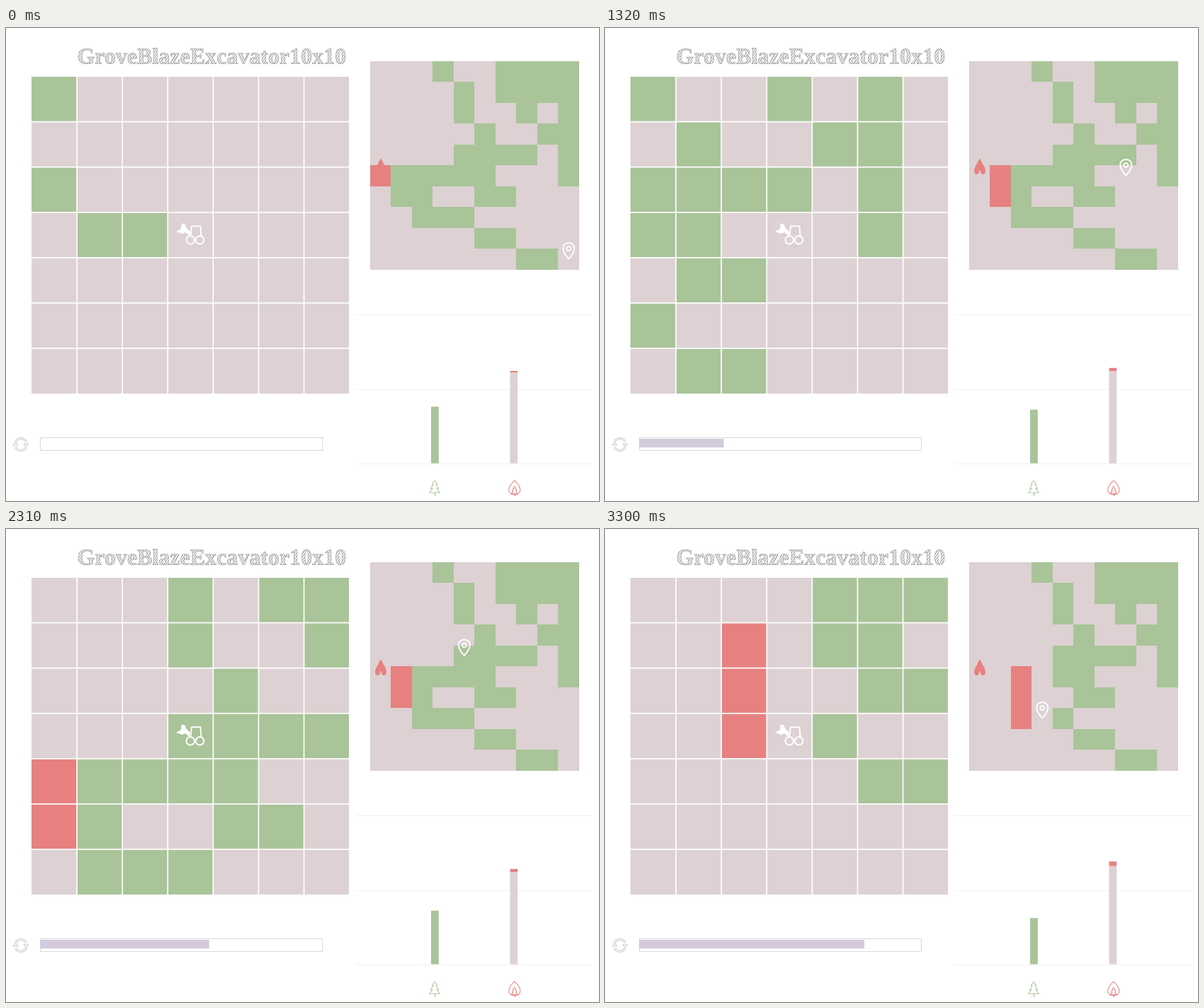
Write a matplotlib script that moves like this. It is 837 by 669 pixels and loops after 3.63 s.

```python
import numpy as np
import matplotlib.pyplot as plt
from matplotlib.animation import FuncAnimation
from matplotlib.collections import LineCollection
from matplotlib.colors import ListedColormap
from matplotlib.patches import Arc, Circle, PathPatch, Polygon, Rectangle
from matplotlib.textpath import TextPath
from matplotlib.transforms import Affine2D

W, H, DPI = 837, 669, 64
PX = 72 / DPI

PALE, GREEN, RED = "#ddd1d3", "#a9c499", "#e68180"
LILAC, GREY, SILVER = "#d3cadb", "#8c8c8c", "#c8c8c8"
EMPTY, TREE, FIRE = 0, 1, 2
CMAP = ListedColormap([PALE, GREEN, RED])

FOREST = """
...#..####
....#.####
....#..#.#
.....#..##
....####.#
*#####...#
.##..##...
..###.....
.....##...
.......##.
""".split()

# Compass moves of the bulldozer; a plus means it also digs where it arrives
START = (9, 9)
MOVES = "N+ N+ NW+ NW NW W W SW+ S+ S+".split()
MOVE_COST, DIG_COST, FIRE_PERIOD = 1, 3, 10

MAP_X, MAP_Y, MAP_SIZE = 514, 47, 295
MAP_CELL = MAP_SIZE / len(FOREST)
VIEW_X, VIEW_Y, VIEW_CELL, VIEW_N = 36, 68.5, 64.1, 7
BASE_Y, UNIT = 615.6, 2.106


def spread(grid):
    """Burn out every fire and light the trees around it."""
    after = grid.copy()
    for r, c in np.argwhere(grid == FIRE):
        near = (slice(max(r - 1, 0), r + 2), slice(max(c - 1, 0), c + 2))
        after[near][grid[near] == TREE] = FIRE
        after[r, c] = EMPTY
    return after


def simulate():
    """List the grid, bulldozer cell and fire clock after every move."""
    grid = np.array([[".#*".index(ch) for ch in row] for row in FOREST])
    row, col = START
    clock = 0
    states = [(grid, row, col, 0)]
    for move in MOVES:
        grid = grid.copy()
        row += ("S" in move) - ("N" in move)
        col += ("E" in move) - ("W" in move)
        clock += MOVE_COST
        if "+" in move:
            clock += DIG_COST
            grid[row, col] = EMPTY
        if clock >= FIRE_PERIOD:
            clock -= FIRE_PERIOD
            grid = spread(grid)
        states.append((grid, row, col, clock / FIRE_PERIOD))
    return states


STATES = simulate()

fig = plt.figure(figsize=(W / DPI, H / DPI), dpi=DPI, facecolor="white")
ax = fig.add_axes([0, 0, 1, 1])
ax.axis("off")


def line(xs, ys, color, width, z=3, **kw):
    ax.plot(xs, ys, color=color, lw=width * PX, zorder=z, **kw)


def shape(points, fill="none", edge="none", width=0, z=5):
    return ax.add_patch(Polygon(points, fc=fill, ec=edge, lw=width * PX,
                                joinstyle="round", zorder=z))


def ring(x, y, r, color, width, z=5):
    return ax.add_patch(Circle((x, y), r, fc="none", ec=color,
                               lw=width * PX, zorder=z))


def rect(x, y, w, h, color, z=3):
    return ax.add_patch(Rectangle((x, y), w, h, fc=color, ec="none",
                                  zorder=z, snap=False))


def drop(x, tip, w, h):
    """Points of a teardrop with its tip at the top, or below if h < 0."""
    t = np.linspace(0, 2 * np.pi, 60, endpoint=False)
    return np.column_stack([x + 0.65 * w * np.sin(t) * np.sin(t / 2),
                            tip + h * (1 - np.cos(t)) / 2])


def grid_image(x, y, size):
    return ax.imshow(np.zeros((2, 2)), cmap=CMAP, vmin=0, vmax=2, zorder=1,
                     extent=(x, x + size, y + size, y),
                     interpolation="nearest", aspect="auto")


def draw_title():
    glyphs = TextPath((0, 0), "GroveBlazeExcavator10x10", size=32,
                      prop={"family": "Liberation Serif", "weight": "bold"})
    box = glyphs.get_extents()
    place = Affine2D().scale(1, -1).translate(290.5 - (box.x0 + box.x1) / 2, 50.5)
    outline = ax.add_patch(PathPatch(glyphs.transformed(place), fc="none",
                                     ec=GREY, lw=0.55 * PX, zorder=4))
    strokes = [[(x, 56), (x + 22, 22)] for x in np.arange(75, 490, 3)]
    hatch = LineCollection(strokes, colors=GREY, linewidths=0.8 * PX, zorder=4)
    ax.add_collection(hatch)
    hatch.set_clip_path(outline)


def draw_view_lines():
    span = np.array([0, VIEW_N * VIEW_CELL + 1])
    for k in range(1, VIEW_N):
        x, y = VIEW_X + k * VIEW_CELL, VIEW_Y + k * VIEW_CELL
        line([x, x], VIEW_Y + span, "white", 1.7, z=2, snap=False)
        line(VIEW_X + span, [y, y], "white", 1.7, z=2, snap=False)


def draw_tractor():
    shape([(240, 288), (247, 284), (248, 276), (253, 278), (254, 282),
           (260, 288), (259, 294), (253, 289), (249, 291)], fill="white")
    line([260.5, 262, 274.5, 275.5], [293.5, 280.2, 280.2, 294], "white", 1.9)
    for x in (260.3, 273.6):
        ring(x, 299.8, 5.7, "white", 2)


def draw_flame(x, top):
    shape(drop(x, top, 9, 17), fill=RED, z=3)
    for side in (-1, 1):
        shape(drop(x + 4.4 * side, top + 8, 7, 14.5), fill=RED, z=3)


def draw_refresh(x, y):
    for size in (19, 15):
        for start in (25, 205):
            ax.add_patch(Arc((x, y), size, size, theta1=start,
                             theta2=start + 130, ec=SILVER, lw=0.9 * PX))
    for side in (-1, 1):
        tip = x + 7.5 * side
        shape([(tip - 3.5, y - side), (tip + 3.5, y - side), (tip, y + 3 * side)],
              edge=SILVER, width=0.9)


def fir(x, top, half, height, color):
    """Outline of a three-tier fir tree with a short trunk."""
    right = [(0, 0)]
    for tier in (1, 2, 3):
        reach, low = half * (tier + 1) / 4, 0.28 * height * tier
        right += [(reach, low), (reach * 0.5, low)]
    points = right + [(-u, v) for u, v in right[:0:-1]]
    shape([(x + u, top + v) for u, v in points], edge=color, width=0.9)
    line([x, x], [top + 0.84 * height, top + height], color, 1.2)


def draw_chart():
    for y in (405.3, 510.5, BASE_Y):
        line([494, 829], [y, y], "#f0f0f0", 1, z=1)
    fir(605, 640, 7.5, 20.5, GREEN)
    fir(717.8, 648, 4.5, 12.5, RED)
    shape(drop(717.8, 640, 16, 20), edge=RED, width=1)


draw_title()
draw_view_lines()
draw_tractor()
draw_flame(529, 184.5)
draw_refresh(21, 589)
draw_chart()

view_img = grid_image(VIEW_X, round(VIEW_Y + 0.2), 448)
map_img = grid_image(MAP_X, MAP_Y, MAP_SIZE)
pin = [shape(drop(0, -0.8, 16, -22.4), edge="white", width=1.9, z=6),
       ring(0, -15.3, 3, "white", 1.8, z=6)]
progress = rect(48.5, 581, 0, 12.3, LILAC)
ax.add_patch(Rectangle((48.5, 578.5), 398, 18, fc="none", ec="#d9d9d9",
                       lw=PX, zorder=2))
tree_bar = rect(600, BASE_Y, 10.8, 0, GREEN)
empty_bar = rect(711.5, BASE_Y, 10.7, 0, PALE)
fire_bar = rect(711.5, BASE_Y, 10.7, 0, RED)

ax.set_xlim(0, W)
ax.set_ylim(H, 0)


def set_bar(bar, start, count):
    bar.set_y(BASE_Y - (start + count) * UNIT)
    bar.set_height(count * UNIT)


def update(step):
    grid, row, col, done = STATES[step]
    padded = np.pad(grid, VIEW_N // 2)
    view_img.set_data(padded[row:row + VIEW_N, col:col + VIEW_N])
    map_img.set_data(grid)

    place = Affine2D().translate(MAP_X + (col + 0.5) * MAP_CELL,
                                 MAP_Y + (row + 0.5) * MAP_CELL)
    for part in pin:
        part.set_transform(part.get_patch_transform().inverted() * 0
                           if False else place + ax.transData)

    progress.set_width(397 * done)
    empty, trees, fires = np.bincount(grid.ravel(), minlength=3)
    set_bar(tree_bar, 0, trees)
    set_bar(empty_bar, 0, empty)
    set_bar(fire_bar, empty, fires)
    return [view_img, map_img, *pin, progress, tree_bar, empty_bar, fire_bar]


anim = FuncAnimation(fig, update, frames=len(STATES), interval=330,
                     repeat=True, repeat_delay=0, blit=False)
plt.show()
```
